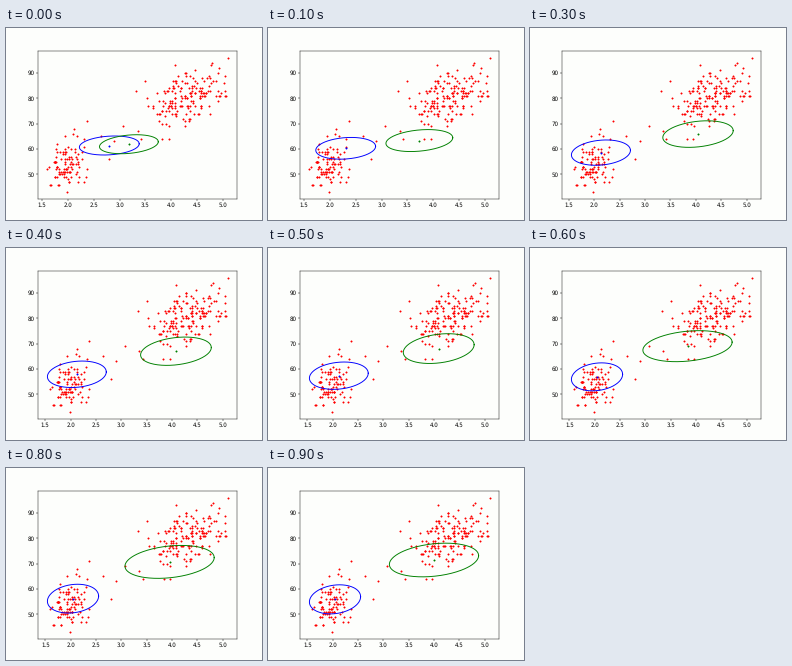
A matplotlib script that plays this animation: 256x192 px, repeating every 1000 ms.

```python
import numpy as np
import matplotlib.pyplot as plt
from matplotlib.animation import FuncAnimation

FRAMES, INTERVAL = 10, 100
JUMP = 6  # step at which both ellipses change shape abruptly
X_MIN, X_MAX, Y_MIN, Y_MAX = 1.6, 5.1, 43, 96
PAPER = "#fdfefc"

# Lone points between and around the two clusters
STRAGGLERS = [
    (1.98, 43), (2.12, 68), (2.37, 71), (2.63, 65), (2.8, 56), (2.9, 63),
    (3.07, 69), (3.32, 83), (3.35, 67), (3.42, 64), (3.5, 87), (3.83, 64),
    (3.95, 64), (4.08, 93), (4.8, 94), (5.1, 96),
]


def cluster(rng, count, mean, sd, rho):
    """Correlated normal points without the far tails."""
    u, v = rng.normal(size=(2, count * 3))
    keep = np.flatnonzero(np.hypot(u, v) < 2.3)[:count]
    u, v = u[keep], v[keep]
    x = mean[0] + sd[0] * u
    y = mean[1] + sd[1] * (rho * u + np.sqrt(1 - rho**2) * v)
    x = np.round(x * 60) / 60
    return np.column_stack([x.clip(X_MIN, X_MAX), np.round(y)])


def settle(start, end, keep, step):
    """Approach end, keeping a fixed share of the distance at each step."""
    return end + (start - end) * keep**step


def blue_ellipse(step):
    late = step >= JUMP
    cx = 2.045 if late else settle(2.8, 2.12, .27, step)
    cy = settle(61.4, 54.5, .84, step)
    width = .505 if late else .58
    return cx, cy, width, settle(3.75, 5.9, .75, step), .18


def green_ellipse(step):
    if step < JUMP:
        cx, width = settle(3.18, 4.1, .4, step), settle(.57, .7, .4, step)
    else:
        cx, width = settle(3.83, 4.29, .86, step - JUMP), .88
    cy = settle(61.9, 80, .92, step)
    return cx, cy, width, settle(3.75, 7.4, .84, step), .26


def outline(cx, cy, a, b, rho):
    t = np.linspace(0, 2 * np.pi, 200)
    return cx + a * np.cos(t), cy + b * np.sin(t + np.arcsin(rho))


def padded(low, high):
    pad = 0.05 * (high - low)
    return low - pad, high + pad


rng = np.random.default_rng(5)
points = np.vstack([
    STRAGGLERS,
    cluster(rng, 95, (2.02, 54.5), (.21, 5.5), .25),
    cluster(rng, 160, (4.3, 80), (.37, 5.9), .37),
])

plt.rcParams["text.hinting"] = "none"
fig, ax = plt.subplots(figsize=(6.4, 4.8), dpi=40, facecolor=PAPER)
fig.subplots_adjust(left=.1265, right=.902)
ax.set_facecolor(PAPER)
dots = dict(markersize=5, markeredgewidth=.9, snap=False)
ax.plot(*points.T, "r.", **dots)
ax.set_ylim(padded(Y_MIN, Y_MAX))
groups = [
    (shape, ax.plot([], [], color, lw=1.7)[0],
     ax.plot([], [], color + ".", **dots)[0])
    for shape, color in ((blue_ellipse, "b"), (green_ellipse, "g"))
]


def update(step):
    left = X_MIN
    for shape, line, center in groups:
        cx, cy, *form = shape(step)
        x, y = outline(cx, cy, *form)
        line.set_data(x, y)
        center.set_data([cx], [cy])
        left = min(left, x.min())
    ax.set_xlim(padded(left, X_MAX))
    return [artist for group in groups for artist in group[1:]]


anim = FuncAnimation(fig, update, frames=FRAMES, interval=INTERVAL, repeat=True)
plt.show()
```
